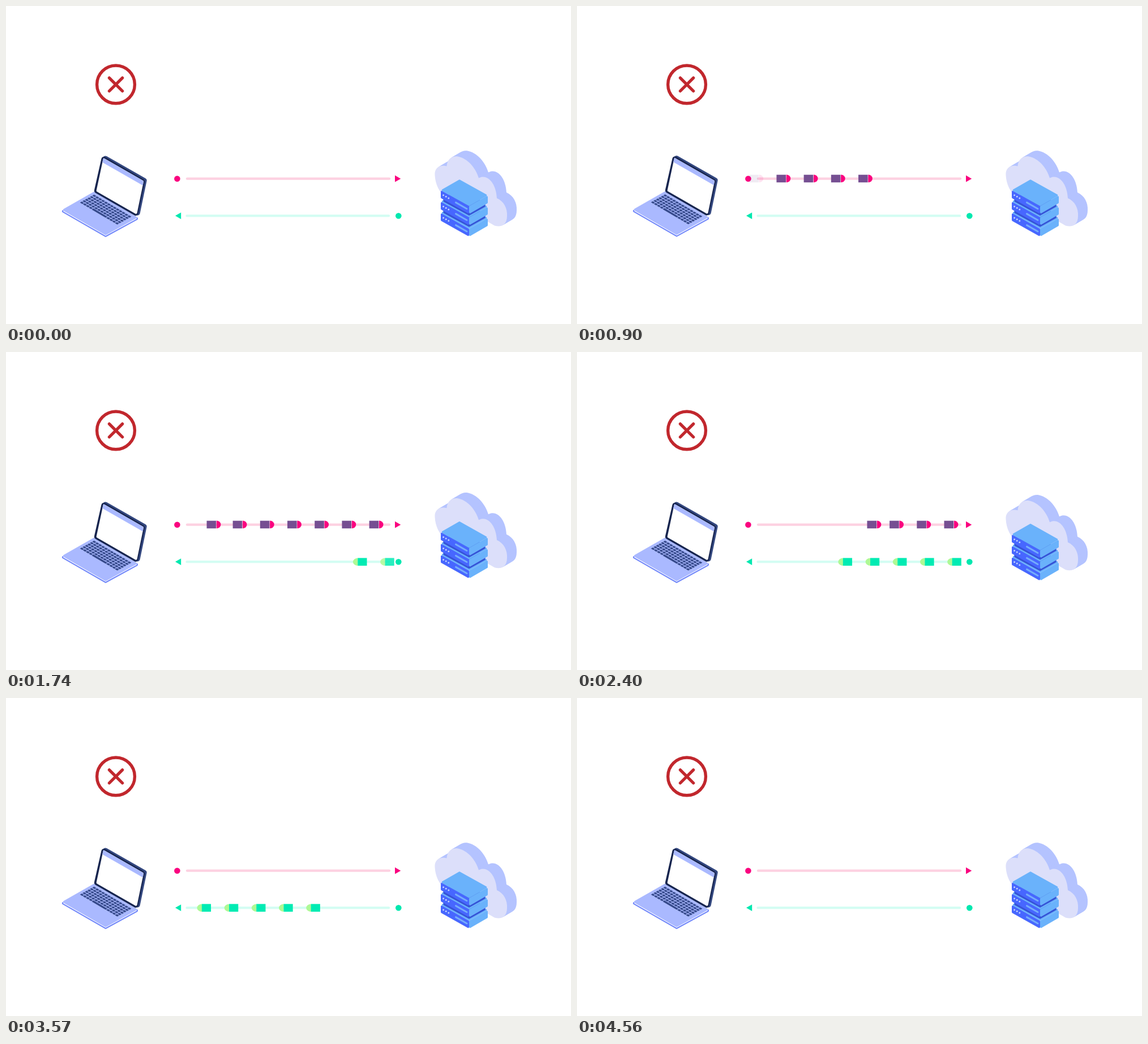
These frames come from a looping animation (998x561 px, 4.73 s). An HTML page with a canvas:

```html
<!DOCTYPE html>
<html lang="en">
<head>
<meta charset="utf-8">
<title>Client and server</title>
<style>
  html, body { margin: 0; width: 100%; height: 100%; overflow: hidden; background: #fff; }
  canvas { display: block; width: 998px; height: 561px; }
</style>
</head>
<body>
<canvas id="stage" width="998" height="561"></canvas>
<script>
const ctx = document.getElementById('stage').getContext('2d');
const LOOP = 4730, STEP = 30, LAST = 4560;
const PINK = '#fa037f', GREEN = '#00e8af';
const LIFT = 13, HOP = 735;
const SPEED = 0.22953, TRAVEL = 367, EVERY = 210, COUNT = 8, FADE = 11;

function poly(color, points, radius = 0) {
  ctx.fillStyle = color;
  ctx.beginPath();
  const n = points.length;
  if (radius) {
    const [a, b] = [points[n - 1], points[0]];
    ctx.moveTo((a[0] + b[0]) / 2, (a[1] + b[1]) / 2);
    points.forEach((p, i) => {
      const q = points[(i + 1) % n];
      ctx.arcTo(p[0], p[1], q[0], q[1], radius);
    });
  } else {
    points.forEach(p => ctx.lineTo(p[0], p[1]));
  }
  ctx.closePath();
  ctx.fill();
}

function line(color, width, x1, y1, x2, y2) {
  ctx.strokeStyle = color;
  ctx.lineWidth = width;
  ctx.lineCap = 'round';
  ctx.beginPath();
  ctx.moveTo(x1, y1);
  ctx.lineTo(x2, y2);
  ctx.stroke();
}

function dot(color, x, y, r) {
  ctx.fillStyle = color;
  ctx.beginPath();
  ctx.arc(x, y, r, 0, Math.PI * 2);
  ctx.fill();
}

function shifted(dx, dy, draw) {
  ctx.save();
  ctx.translate(dx, dy);
  draw();
  ctx.restore();
}

function hop(t, starts) {
  const start = starts.find(s => t > s && t < s + HOP);
  if (start === undefined) return 0;
  return -LIFT * (1 - Math.cos((t - start) / HOP * Math.PI * 2)) / 2;
}

function errorSign() {
  ctx.strokeStyle = '#c1272d';
  ctx.lineWidth = 5.4;
  ctx.beginPath();
  ctx.arc(194, 138.4, 33.4, 0, Math.PI * 2);
  ctx.stroke();
  line('#c1272d', 5.3, 182.4, 126.8, 205.6, 150);
  line('#c1272d', 5.3, 205.6, 126.8, 182.4, 150);
}

function keyboard() {
  const along = [67 / 13, 39.4 / 13], down = [-26 / 6, 14.6 / 6];
  const at = (c, r) => [
    155.5 + along[0] * c + down[0] * r,
    332.8 + along[1] * c + down[1] * r
  ];
  for (let r = 0; r < 6; r++) {
    for (let c = 0; c < 13; c++) {
      const space = r === 5 && c === 4;
      const end = c + (space ? 5 : 1) - 0.2;
      poly('#35498a', [at(c, r), at(end, r), at(end, r + 0.74), at(c, r + 0.74)]);
      if (space) c += 4;
    }
  }
}

function laptop() {
  const deck = [[98.8, 359.8], [155.5, 327.5], [233, 373], [176, 404.2]];
  const [left, , right, front] = deck;
  const lower = (p, dy) => [p[0], p[1] + dy];
  poly('#7389fa', [left, right, lower(right, 3.6), lower(front, 3.6), lower(left, 3.6)], 2);
  poly('#ffffff', deck.map(p => lower(p, 1.2)), 2);
  poly('#aab9ff', deck, 2);
  keyboard();
  poly('#33477f', [[172.5, 262], [249.2, 305.5], [235.4, 372], [159, 327]], 4.5);
  poly('#17254f', [[169.8, 263.5], [245.7, 307.4], [232.2, 372.4], [155.2, 328]], 4.5);
  const screen = [[172, 268], [243.2, 308.8], [231, 367.8], [159.4, 326.8]];
  poly('#ffffff', screen, 2);
  poly('#aab9ff', [screen[0], screen[1], [241.6, 316.6], [170.2, 275.8]]);
}

const cloud = new Path2D(
  'M757.5 298 C756.5 286 766 279.5 778.5 282.5 C779 271 787 264.5 797 265.3 ' +
  'C815 268 830 286 835 303.5 C851 295 866 314 867 339 ' +
  'C879 344 886 357 885 370.5 C885 386 875 391 863 387.5 L778 338 C765 330 758 313 757.5 298 Z'
);

// Isometric box given the top-left height, wall height and inset from the rack edge.
function box(y, height, inset, top, left, right) {
  const k = inset * 0.7;
  const w = [768 + inset, y], n = [801, y - 19 + k];
  const e = [851 - inset, y + 9], s = [818, y + 28 - k];
  const low = p => [p[0], p[1] + height];
  const r = inset ? 0 : 1.6;
  poly(right, [s, e, low(e), low(s)], r);
  poly(left, [w, s, low(s), low(w)], r);
  poly(top, [n, e, s, w], r);
}

function server() {
  for (let i = 10; i >= 1; i--) {
    shifted(1.7 * i, -i, () => {
      ctx.fillStyle = '#b4c3ff';
      ctx.fill(cloud);
    });
  }
  ctx.fillStyle = '#dcdffa';
  ctx.fill(cloud);
  for (let i = 2; i >= 0; i--) {
    const y = 325 + 20 * i;
    box(y, 13.8, 0, '#6ab2fb', '#4767ff', '#6ab2fb');
    for (let d = 0; d < 3; d++) dot('#c3d2ff', 772.6 + 4.6 * d, y + 8.7 + 2.6 * d, 1.5);
    line('#74adfb', 3, 794.5, y + 21.6, 814, y + 32.7);
    if (i) box(y - 6.5, 6.5, 4.5, '#3653d6', '#3653d6', '#3653d6');
  }
}

function pinkPacket(x) {
  ctx.fillStyle = '#764f92';
  ctx.fillRect(x, 297.7, 16.6, 13.5);
  ctx.fillStyle = PINK;
  ctx.beginPath();
  ctx.ellipse(x + 17.3, 304.4, 7.6, 6.8, 0, -Math.PI / 2, Math.PI / 2);
  ctx.fill();
}

function greenPacket(right) {
  ctx.fillStyle = '#aef995';
  ctx.beginPath();
  ctx.ellipse(right - 16, 370.2, 8.6, 6.8, 0, Math.PI / 2, Math.PI * 1.5);
  ctx.fill();
  ctx.fillStyle = '#00ebb3';
  ctx.fillRect(right - 16.2, 363.4, 16.2, 13.6);
}

function stream(t, start, lastSpeed, draw) {
  for (let k = 0; k < COUNT; k++) {
    const speed = k === COUNT - 1 ? lastSpeed : SPEED;
    const d = (t - start - EVERY * k) * speed;
    if (d <= 0 || d >= TRAVEL) continue;
    ctx.globalAlpha = Math.min(1, d / FADE, (TRAVEL - d) / FADE);
    draw(d);
  }
  ctx.globalAlpha = 1;
}

function render(t) {
  ctx.fillStyle = '#fff';
  ctx.fillRect(0, 0, 998, 561);
  errorSign();
  shifted(0, hop(t, [13, 855]), laptop);
  shifted(0, hop(t, [1543, 2278]), server);

  line('#fdd1e1', 4.4, 320, 304.6, 677, 304.6);
  line('#d4fdf3', 4.4, 319.5, 370.1, 676, 370.1);
  dot(PINK, 302.4, 304.7, 5.3);
  poly(PINK, [[687, 298.8], [697.2, 304.7], [687, 310.6]]);
  dot(GREEN, 693.3, 370.2, 5.3);
  poly(GREEN, [[309.2, 364.2], [299, 370.1], [309.2, 376]]);

  stream(t, 54.7, 0.2393, d => pinkPacket(303 + d));
  stream(t, 1489.5, SPEED, d => greenPacket(695 - d));
}

function tick() {
  const t = performance.now() % LOOP;
  render(Math.min(LAST, Math.floor(t / STEP) * STEP));
  requestAnimationFrame(tick);
}
tick();
</script>
</body>
</html>
```
